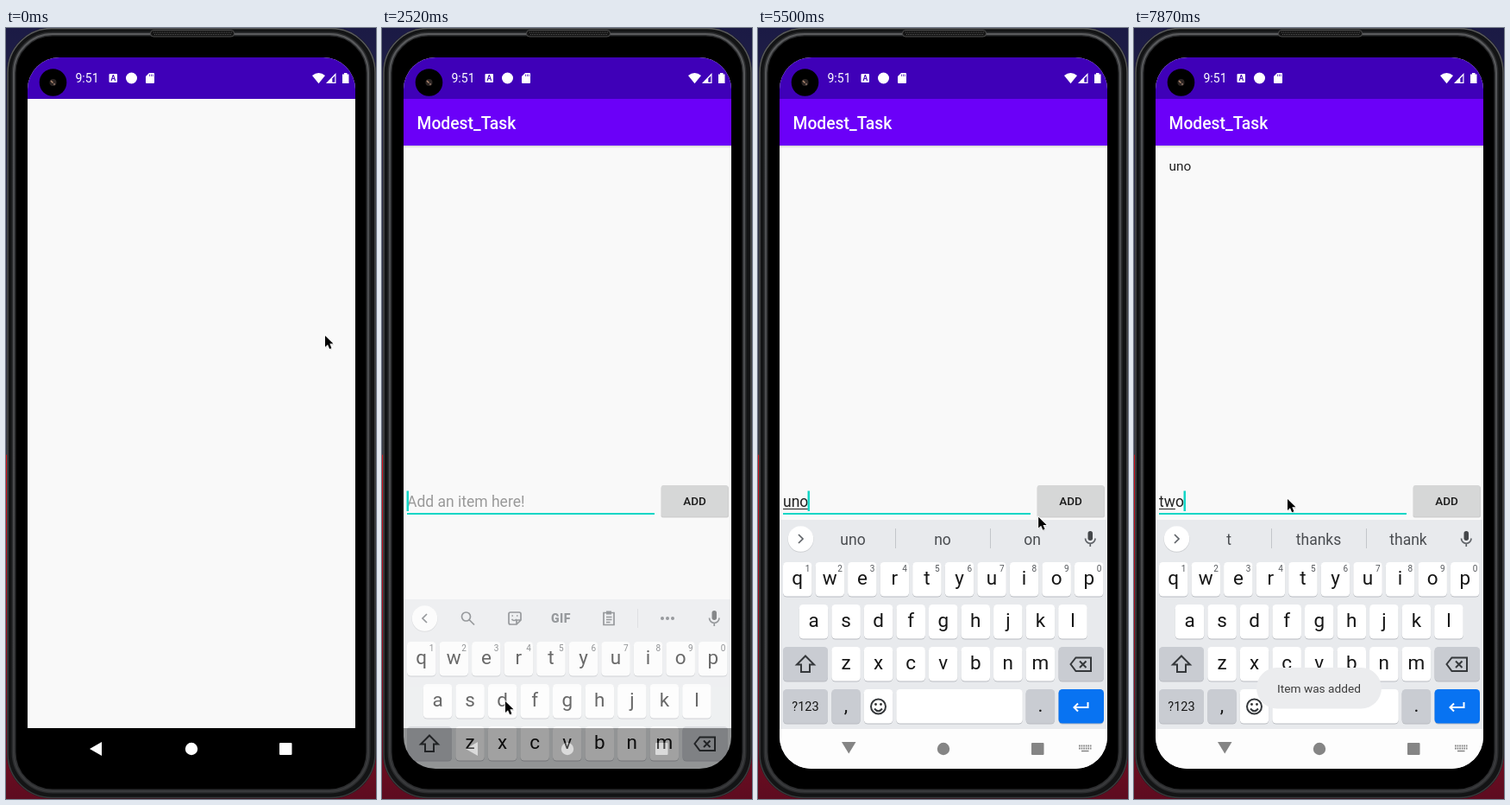
These frames come from a looping animation (429x892 px, 8000 ms). An HTML page:

```html
<!DOCTYPE html>
<html lang="en">
<head>
<meta charset="utf-8">
<title>To-do app</title>
<style>
  html, body { margin: 0; width: 100%; height: 100%; overflow: hidden; background: #000; }
  svg { display: block; width: 429px; height: 892px; font-family: Roboto, sans-serif; }
  .mid { text-anchor: middle; }
  .line { fill: none; stroke: #5f6368; stroke-width: 1.7; }
  .dark { stroke: #35383b; stroke-width: 2; }
  .light { stroke: #fff; stroke-width: 2; }
</style>
</head>
<body>
<svg viewBox="0 0 429 892" xmlns="http://www.w3.org/2000/svg">
  <defs>
    <linearGradient id="wall" x1="0" y1="0" x2="0" y2="1">
      <stop offset="0" stop-color="#1b1a45"/><stop offset=".25" stop-color="#2c2f45"/>
      <stop offset=".553" stop-color="#3a3c48"/><stop offset=".554" stop-color="#d3121c"/>
      <stop offset=".75" stop-color="#a50f20"/><stop offset="1" stop-color="#5d0c20"/>
    </linearGradient>
    <linearGradient id="rim" x1="0" y1="0" x2="0" y2="1">
      <stop offset="0" stop-color="#5a5b5d"/><stop offset=".15" stop-color="#4d4f52"/>
      <stop offset=".6" stop-color="#4a4b4d"/><stop offset="1" stop-color="#38393b"/>
    </linearGradient>
    <linearGradient id="barShade" x1="0" y1="0" x2="0" y2="1">
      <stop offset="0" stop-color="#000" stop-opacity=".16"/><stop offset="1" stop-color="#000" stop-opacity="0"/>
    </linearGradient>
    <clipPath id="screen"><rect x="25" y="34" width="380" height="823" rx="37"/></clipPath>
  </defs>

  <rect width="429" height="892" fill="url(#wall)"/>
  <rect x="1" y="-.5" width="428" height="892" rx="52" fill="#131415"/>
  <rect x="2" y=".5" width="426" height="890" rx="51" fill="none" stroke="url(#rim)" stroke-width="1.5"/>
  <rect x="9" y="7" width="411" height="876" rx="45" fill="#000" stroke="#2b2c2e" stroke-width="5"/>
  <rect x="9" y="7" width="411" height="876" rx="45" fill="none" stroke="url(#rim)" stroke-width="2"/>
  <rect x="167.5" y="2.5" width="97" height="7.5" rx="3.5" fill="#151515" stroke="#4c4c4c"/>
  <path d="M171 5H262M172 7.5H262" stroke="#555" stroke-dasharray="1 1"/>

  <g clip-path="url(#screen)">
    <rect x="25" y="34" width="380" height="777" fill="#f9f9f9"/>
    <rect x="25" y="34" width="380" height="48" fill="#3f00b8"/>
    <g fill="#fff">
      <text x="80.5" y="63" font-size="14">9:51</text>
      <rect x="119.5" y="53" width="9.5" height="10" rx="1"/>
      <circle cx="145.5" cy="58" r="6.5"/>
      <path d="M166 52H171Q172 52 172 53V63Q172 64 171 64H163Q162 64 162 63V56Z"/>
      <path d="M362.5 64.2L355 55Q362.5 49 370 55Z"/>
      <path d="M371 64L382.5 52V64Z"/>
      <path d="M390 53.5H392V52H395.5V53.5H397.5V64H390Z"/>
    </g>
    <text class="mid" x="124.25" y="61.2" font-size="8.5" font-weight="700" fill="#3f00b8">A</text>
    <path d="M378.3 58.4L381.3 55.2V62.8H378.3Z" fill="#3f00b8"/>
    <path d="M166.5 53.5V56M168.5 53.5V56M170.3 53.5V56" stroke="#3f00b8" stroke-width=".7"/>

    <rect x="25" y="810" width="380" height="47"/>
    <g id="app">
      <rect x="25" y="82" width="380" height="54" fill="#6b00f8"/>
      <rect x="25" y="136" width="380" height="3" fill="url(#barShade)"/>
      <text x="40.5" y="117" font-size="19.29" font-weight="500" fill="#fff">Modest_Task</text>
      <text id="item" x="40.5" y="165" font-size="15.43" fill="#212121">uno</text>
      <g id="form">
        <text id="hint" x="29" y="795" font-size="17.5" fill="#999">Add an item here!</text>
        <text id="typed" x="29" y="795" font-size="17.5" fill="#212121"></text>
        <rect id="under" x="29" y="797" height="1" fill="#212121"/>
        <rect id="rule" x="29" y="802" width="287"/>
        <rect id="caret" y="776.5" width="2.5" height="23.5" fill="#12d6c6"/>
        <rect x="323.5" y="771" width="78.5" height="36.5" rx="2" opacity=".17"/>
        <rect id="button" x="324" y="770" width="77" height="36" rx="2"/>
        <text class="mid" x="362.5" y="793" font-size="13.5" font-weight="500" fill="#1c1c1c">ADD</text>
      </g>
    </g>
    <g id="nav">
      <path d="M97 834L111 826V842Z"/><circle cx="215" cy="834" r="7.2"/>
      <rect x="317" y="827" width="14.5" height="14" rx="1"/>
    </g>

    <g id="board">
      <rect x="25" y="569" width="380" height="300" fill="#e8eaed"/>
      <circle cx="49.5" cy="591.8" r="15" fill="#cfd1d4"/>
      <circle cx="49.5" cy="591" r="14.7" fill="#fff"/>
      <path id="chevron" class="line"/>
      <g id="tools">
        <circle class="line" cx="97.5" cy="589" r="5"/><path class="line" d="M101 592.5L107 598.5"/>
        <path class="line" d="M149 584H159Q161 584 161 586V593L156 598H149Q147 598 147 596V586Q147 584 149 584ZM161 593H156V598M150.5 592Q153 595 156 592M150.5 588H152M156 588H157.5"/>
        <text class="mid" x="207.5" y="596" font-size="14" font-weight="900" fill="#5f6368" letter-spacing=".5">GIF</text>
        <path class="line" d="M257 584.5H269V598.5H257ZM260 589.5H266.5M260 592.5H266.5M260 595.5H264.5"/>
        <rect x="260" y="582.5" width="6" height="4" fill="#5f6368"/>
        <path d="M296.5 580V602" stroke="#d0d3d7"/>
        <g fill="#5f6368"><circle cx="325" cy="591" r="2"/><circle cx="331" cy="591" r="2"/><circle cx="337" cy="591" r="2"/></g>
      </g>
      <g id="words" font-size="17.5" fill="#4a4d51">
        <text class="mid" x="110" y="598"></text><text class="mid" x="214" y="598"></text><text class="mid" x="318" y="598"></text>
        <path d="M159.5 579V602M269.5 579V602" stroke="#c3c6ca"/>
      </g>
      <rect x="382.5" y="582" width="5.5" height="11" rx="2.75" fill="#44474a"/>
      <path class="line" d="M379.5 590.5A5.7 5.7 0 0 0 391 590.5M385.25 596V600"/>
      <g id="keys"></g>
      <path class="line dark" d="M55 726.5L65 736.5H60V745H50V736.5H45Z"/>
      <path class="line dark" d="M362.5 736L368.5 728.5H386V744H368.5ZM373 732.5L380.5 740M380.5 732.5L373 740"/>
      <circle class="line dark" cx="139.5" cy="785" r="8.5"/>
      <path class="line dark" d="M135 787.5Q139.5 793 144 787.5"/>
      <circle cx="136.5" cy="782.5" r="1.4" fill="#333"/><circle cx="142.5" cy="782.5" r="1.4" fill="#333"/>
      <path class="line light" d="M382.5 780V786H367M371 781.5L366.5 786L371 790.5"/>
    </g>

    <g id="lightNav" fill="#858585">
      <rect x="25" y="811" width="380" height="46" fill="#fdfdfd"/>
      <path d="M97 826H113.5L105.25 839.5Z"/><circle cx="215" cy="834" r="7.2"/>
      <rect x="317" y="827" width="14.5" height="14" rx="1"/>
      <path d="M372 830.5H386.5M372 833.5H386.5" stroke="#858585" stroke-width="2" stroke-dasharray="1.7 .9"/>
      <path d="M375 836.5H383.5" stroke="#858585" stroke-width="1.5"/>
    </g>
    <g id="toast">
      <rect x="142" y="740" width="145" height="47.5" rx="23.75" fill="#ebecee"/>
      <text class="mid" x="214.5" y="769" font-size="13.7" fill="#3c3c3c">Item was added</text>
    </g>
  </g>

  <circle cx="54.5" cy="63" r="15.8"/>
  <circle cx="54.5" cy="63" r="4" fill="#2c2523"/>
  <path d="M52 61L54.5 63.5" stroke="#b08a70" stroke-width="1.5"/><circle cx="56" cy="65" r="1.2" fill="#77635a"/>

  <g id="mouse">
    <path d="M.5 1V16.5L4 13.3L6.5 19L9.5 17.7L7 12.2H12Z" transform="scale(.86)" opacity=".2"/>
    <path d="M0 0V15L3.5 11.8L6 17.6L8.6 16.5L6.2 10.9H11Z" transform="scale(.86)" stroke="#fff" stroke-width="1.6" paint-order="stroke"/>
  </g>
</svg>
<script>
const LOOP = 8000, STEP = 148.5, PITCH = 37.55;
const $ = id => document.getElementById(id);
const set = (el, attrs) => { for (const k in attrs) el.setAttribute(k, attrs[k]); };
const show = (el, on) => { el.style.display = on ? '' : 'none'; };

function add(tag, attrs, text) {
  const el = document.createElementNS('http://www.w3.org/2000/svg', tag);
  set(el, attrs);
  if (text) el.textContent = text;
  $('keys').append(el);
}

function key(x, y, w, label, fill = '#fff', size = 22.5) {
  add('rect', { x, y: y + 1, width: w, height: 39.5, rx: 4.5, fill: '#b9bcc1' });
  add('rect', { x, y, width: w, height: 39.5, rx: 4.5, fill });
  if (label) add('text', { x: x + w / 2, y: y + (size < 20 ? 25 : 26), class: 'mid', 'font-size': size, fill: '#161616' }, label);
}

[['qwertyuiop', 29, 618], ['asdfghjkl', 47.8, 667], ['zxcvbnm', 85.3, 716]].forEach(([row, x0, y], r) =>
  [...row].forEach((c, i) => {
    const x = x0 + i * PITCH;
    key(x, y, 33.5, c);
    if (!r) add('text', { x: x + 28.5, y: y + 11, class: 'mid', 'font-size': 10, fill: '#55585c' }, String((i + 1) % 10));
  }));
const GREY = '#c9ccd2';
key(29, 716, 52, '', GREY);
key(348.5, 716, 52.5, '', GREY);
key(29, 765, 52, '?123', GREY, 14.5);
key(85.3, 765, 33.5, ',', GREY);
key(122.8, 765, 33.5, '');
key(160.3, 765, 146.5, '');
key(310.6, 765, 33.5, '.', GREY);
key(348.5, 765, 52.5, '', '#0873f2');

// Rows start with a step number; the rest are values at that step.
const MOUSE = [[0, 370, 356], [1, 345, 333], [3, 194, 228], [4, 182, 320], [6, 160, 580], [8, 143.5, 758], [9, 143.5, 768],
  [10, 143.5, 778], [17, 143, 779], [19, 232, 642], [20, 251.5, 611], [35, 251.5, 605], [38, 362, 546], [39, 362, 546], [42, 196, 542],
  [43, 188, 546], [46, 178, 545]];
const BOARD = [[14, 290, 0], [15, 240, .1], [16, 165, .33], [17, 92, .63], [18, 30, .88], [19, 0, 1]];
const NAV = [[0, 255], [1, 255], [3, 214], [6, 154]];
const TOAST = [[39, 0], [40, .4], [42, 1]];
const TYPED = [[0, '', 0], [26, 'u', 0], [27, 'un', 1], [28, 'uno', 2], [30, 'uno', 3], [39, '', 0], [52, 'tw', 1], [53, 'two', 2]];
const WORDS = [[0], [27, 'u', 'up', 'using'], [28, 'un', 'in', "I'm"], [30, 'uno', 'no', 'on'], [39], [53, 't', 'thanks', 'thank']];
const CARET = [[16, 20], [23, 33], [36, 42], [46, 49], [52, 54]];

const held = (rows, k) => rows.filter(r => r[0] <= k).pop().slice(1);
function blend(rows, k) {
  const i = rows.findIndex(r => r[0] > k);
  if (i < 0) return rows[rows.length - 1].slice(1);
  if (!i) return rows[0].slice(1);
  const a = rows[i - 1], b = rows[i], f = (k - a[0]) / (b[0] - a[0]);
  return a.slice(1).map((v, n) => v + (b[n + 1] - v) * f);
}

function draw(k) {
  const [x, y] = blend(MOUSE, k);
  set($('mouse'), { transform: `translate(${x} ${y})` });
  show($('mouse'), k < 21 || k >= 35);
  show($('app'), k >= 2);
  show($('item'), k >= 39);

  const g = Math.round(blend(NAV, k)[0]);
  set($('nav'), { fill: `rgb(${g},${g},${g})` });
  show($('lightNav'), k >= 19);

  const focus = k >= 13;
  set($('form'), { transform: `translate(0 ${k >= 16 ? -241 : 0})` });
  set($('rule'), { height: focus ? 2 : 1, fill: focus ? '#12d6c6' : '#858585' });
  set($('button'), { fill: k === 38 || k === 39 ? '#c3c4c4' : '#d6d7d7' });

  const [text, marked] = held(TYPED, k), typed = $('typed');
  typed.textContent = text;
  show($('hint'), !text);
  set($('under'), { width: marked ? typed.getSubStringLength(0, marked) : 0 });
  set($('caret'), { x: 28.5 + (text ? Math.round(typed.getComputedTextLength()) : 0) });
  show($('caret'), CARET.some(([a, b]) => k >= a && k < b));

  const [drop, alpha] = blend(BOARD, k);
  set($('board'), { transform: `translate(0 ${drop})`, opacity: alpha });
  const words = held(WORDS, k), listing = words.length > 0;
  show($('tools'), !listing);
  show($('words'), listing);
  words.forEach((w, i) => { $('words').children[i].textContent = w; });
  set($('chevron'), { d: listing ? 'M47 586L52 591L47 596' : 'M52 586L47 591L52 596' });

  set($('toast'), { opacity: blend(TOAST, k)[0] });
}

const start = performance.now();
let last = -1;
function tick() {
  const t = (performance.now() - start) % LOOP;
  // A small lead keeps each step on its rounded display time.
  const k = Math.min(53, Math.floor((t + 8) / STEP));
  if (k !== last) draw(last = k);
  requestAnimationFrame(tick);
}
tick();
</script>
</body>
</html>
```
